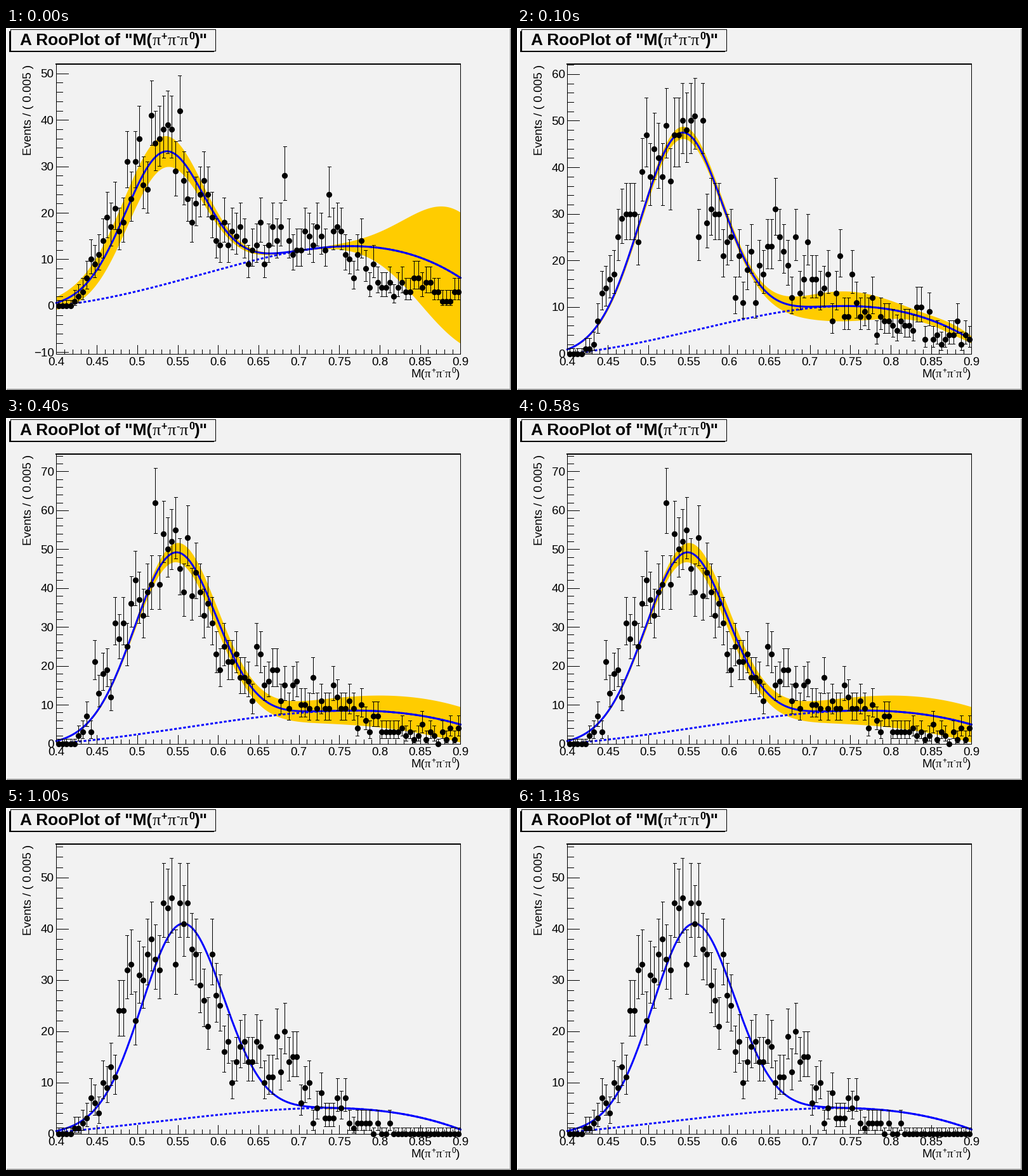
Write a matplotlib script that moves like this. It is 796 px wide and 572 px high and loops after 1.3 s.

```python
import numpy as np
import matplotlib.pyplot as plt
from matplotlib.animation import FuncAnimation
from matplotlib.patches import Rectangle

W, H, DPI = 796, 572, 100
PT = 72 / DPI                                # points per pixel
LEFT, RIGHT, TOP, BOTTOM = 79.4, 716.4, 57.0, 514.5
BG, GOLD, BLUE = "#f2f2f2", "#ffcc00", "#0000ff"
SANS, SERIF = "Liberation Sans", "Liberation Serif"

fig = plt.figure(figsize=(W / DPI, H / DPI), dpi=DPI, facecolor=BG)
ax = fig.add_axes([0, 0, 1, 1])
ax.set_xlim(0, W)
ax.set_ylim(H, 0)
ax.axis("off")


def box(x0, y0, x1, y1, color, z=0):
    ax.add_patch(Rectangle((x0, y0), x1 - x0, y1 - y0, fc=color, lw=0, zorder=z))


def label(x, y, s, px=18.8, **kw):
    kw = {"family": SANS, "va": "baseline", "zorder": 6, **kw}
    return ax.text(x, y, s, fontsize=px * PT, **kw)


def line(xs, ys, px=1, color="k", **kw):
    return ax.plot(xs, ys, color=color, lw=px * PT, **kw)[0]


def formula(x, y, head, head_em, tail, px, weight="normal"):
    """Write head + pi+ pi- pi0 + tail; advances are in em."""
    label(x, y, head, px, weight=weight)
    x += head_em * px
    for sign, em in (("+", 0.584), ("-", 0.333), ("0", 0.556)):
        label(x, y, "π", px, family=SERIF)
        x += 0.549 * px
        label(x, y - 0.36 * px, sign, px * 0.61, weight=weight)
        x += em * 0.61 * px
    label(x, y, tail, px, weight=weight)


def to_x(m):
    return LEFT + (np.asarray(m) - 0.4) / 0.5 * (RIGHT - LEFT)


def gauss(m, height, mean, sigma):
    return height * np.exp(-0.5 * ((m - mean) / sigma) ** 2)


def background(m, heights):
    """Quartic through five evenly spaced heights."""
    coef = np.polyfit(np.linspace(-1, 1, 5), heights, 4)
    return np.maximum(np.polyval(coef, (m - 0.65) / 0.25), 0)


def simulate(m, model, excess, fade, top, seed):
    """Poisson counts: threshold, a bump beside the peak and a fading tail."""
    trend = model(m + 0.01) + gauss(m, excess, 0.67, 0.03)
    trend *= np.clip((m - 0.415) / 0.03, 0, 1)
    trend *= 1 - fade * np.clip((m - 0.75) / 0.06, 0, 1)
    n = np.random.default_rng(seed).poisson(trend)
    mass, most = top
    n = np.minimum(n, most - 1)
    n[np.argmin(abs(m - mass))] = most
    return n


def poisson_bounds(n):
    """Approximate 68% interval of a Poisson count."""
    k = np.maximum(n, 1)
    low = k * (1 - 1 / (9 * k) - 1 / (3 * np.sqrt(k))) ** 3
    high = n + np.sqrt(n + 0.75) + 1
    return np.where(n > 0, low, 0), np.where(n > 0, high, 1.15)


def draw_fit(seed, peak, bkg, band, top, fade, lo=0):
    """Draw one fit result and return its artists."""
    def model(m):
        return background(m, bkg) + gauss(m, *peak)

    bins = 0.4025 + 0.005 * np.arange(100)
    n = simulate(bins, model, 0.2 * peak[0], fade, top, seed)
    low, high = poisson_bounds(n)
    hi = 1.05 * high.max()

    def to_y(v):
        return BOTTOM - (np.asarray(v) - lo) / (hi - lo) * (BOTTOM - TOP)

    out = []
    for v in range(int(np.ceil(lo / 2)) * 2, int(hi) + 1, 2):
        major = v % 10 == 0
        y = to_y(v)
        out.append(line([LEFT, LEFT + (19 if major else 10)], [y, y], zorder=5))
        if major:
            s = str(v).replace("-", "−")
            out.append(label(75.5, y + 6.5, s, ha="right"))

    m = np.linspace(0.4, 0.9, 201)
    x, total = to_x(m), model(m)
    err = sum(gauss(m, *hump) for hump in band)
    out.append(ax.fill_between(x, to_y(np.maximum(total - err, lo)),
                               to_y(total + err), color=GOLD, lw=0, zorder=1))
    out.append(line(x, to_y(background(m, bkg)), 3, BLUE, ls=(0, (1.4, 1.0)),
                    dash_capstyle="butt", zorder=2))
    out.append(line(x, to_y(total), 3, BLUE, zorder=2))

    px = to_x(bins)
    bar = dict(colors="k", lw=PT, zorder=3, antialiased=False)
    out.append(ax.vlines(px, to_y(high), to_y(low), **bar))
    for end in (low, high):
        out.append(ax.hlines(to_y(end), px - 2.5, px + 2.5, **bar))
    out.append(ax.plot(px, to_y(n), "o", color="k", ms=9.2 * PT, mew=0, zorder=4)[0])
    return out


# Canvas bevel and title box
box(0, 0, W, 2, "#fcfcfc")
box(0, 0, 2, H, "#fcfcfc")
box(W - 2, 1, W, H, "#a0a0a0")
box(1, H - 2, W, H, "#a0a0a0")
box(5, 5, 328, 38, "k", 1)
box(7, 2, 331, 37, "k", 2)
box(8, 3, 330, 36, BG, 3)
formula(21.5, 27, 'A RooPlot of "M(', 7.973, ')"', 26.2, "bold")

# Frame, horizontal axis and axis titles
line([LEFT, RIGHT, RIGHT, LEFT, LEFT], [TOP, TOP, BOTTOM, BOTTOM, TOP], zorder=5)
line([LEFT, RIGHT], [TOP, TOP], 2, zorder=5)
for i in range(51):
    m = 0.4 + 0.01 * i
    x = to_x(m)
    major = i % 5 == 0
    line([x, x], [BOTTOM, BOTTOM - (14 if major else 7)], zorder=5)
    if major:
        label(x, 533, f"{m:.2f}".rstrip("0"), ha="center")
formula(638, 552, "M(", 1.166, ")", 19)
label(40, 201, "Events / ( 0.005 )", rotation=90, rotation_mode="anchor")

# Peaks and band humps are (height, mean, sigma); top is (mass, count)
fits = [
    draw_fit(1, peak=(28.6, 0.533, 0.048), bkg=(0, 4.2, 10, 12.8, 6),
             band=[(3.8, 0.5, 0.07), (14.1, 0.9, 0.06)],
             top=(0.5525, 42), fade=0.5, lo=-10.3),
    draw_fit(2, peak=(43.1, 0.5405, 0.0505), bkg=(0, 3.7, 8.5, 10, 3),
             band=[(1.3, 0.54, 0.06), (3.2, 0.74, 0.06), (0.9, 0.88, 0.025)],
             top=(0.5575, 51), fade=0.2),
    draw_fit(3, peak=(45.4, 0.547, 0.0505), bkg=(0, 3.1, 6.8, 8.5, 4.9),
             band=[(2, 0.57, 0.045), (4.6, 0.88, 0.17)],
             top=(0.5225, 62), fade=0.6),
    draw_fit(4, peak=(42, 0.557, 0.0497), bkg=(4.9, 5.9, 6.1, 5.1, 2.8),
             band=[(0.8, 0.4, 0.04), (0.9, 0.557, 0.025), (1.6, 0.92, 0.1)],
             top=(0.5425, 55), fade=0.5),
    draw_fit(5, peak=(38.1, 0.556, 0.0503), bkg=(0.2, 2.35, 4.4, 4.8, 0.8),
             band=[(0.27, 0.557, 0.006), (0.27, 0.737, 0.006)],
             top=(0.5425, 46), fade=0.95),
]


def update(i):
    """The first fit stays one step, the others three steps each."""
    now = (i + 2) // 3
    for k, group in enumerate(fits):
        for artist in group:
            artist.set_visible(k == now)
    return []


update(0)
anim = FuncAnimation(fig, update, frames=13, interval=100, repeat=True,
                     repeat_delay=0, blit=False)
plt.show()
```
